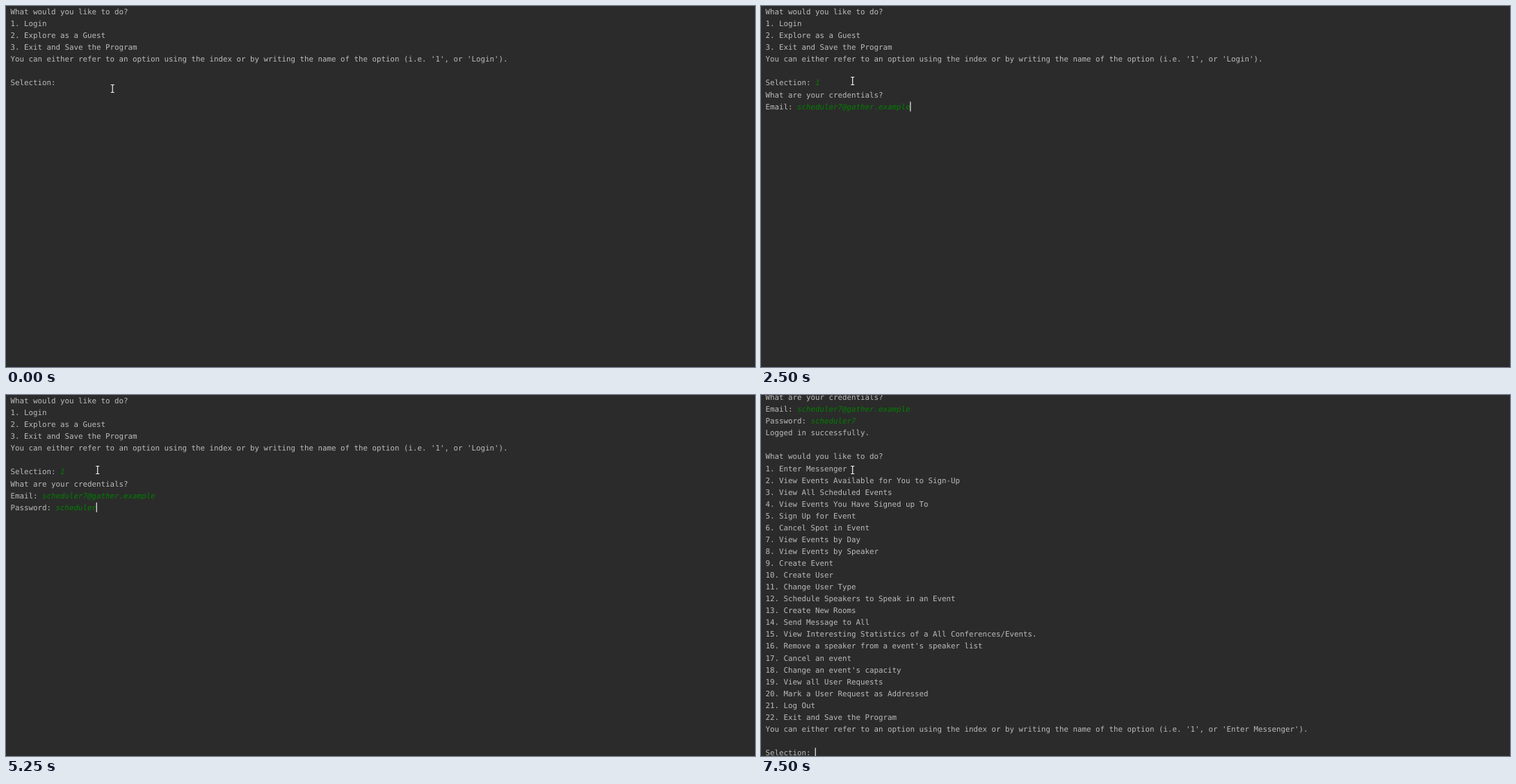
Animation, 1077 px wide and 520 px high, one loop 8000 ms. Source, as an HTML page:

```html
<!DOCTYPE html>
<html lang="en">
<head>
<meta charset="utf-8">
<title>Console login</title>
<style>
  html, body { margin: 0; width: 100%; height: 100%; overflow: hidden; background: #2b2b2b; }
  svg { display: block; }
  text {
    font: 10.8px "DejaVu Sans Mono", monospace;
    fill: #bbb;
    white-space: pre;
    text-rendering: geometricPrecision;
  }
  .input { fill: #007f00; font-style: italic; }
  #caret { fill: #d0d0d0; }
  #pointer { fill: none; stroke: #f4f4f4; stroke-width: 1.2; }
</style>
</head>
<body>
<svg width="1077" height="520">
  <g id="console">
    <g id="rows"></g>
    <rect id="caret" width="1.4" height="14"/>
  </g>
  <path id="pointer" d="M-2.5-5.5H2.5M0-5.5V5.5M-2.5 5.5H2.5"/>
</svg>
<script>
const LOOP = 8000, TICK = 250, BLINK = 500, CARET_HOLD = 750;
const LEFT = 6.4, CHAR = 6.5, BASELINE = 12.12, PITCH = 17.06, LAST_BASELINE = 519;

const hint = name => "You can either refer to an option using the index or by writing " +
  `the name of the option (i.e. '1', or '${name}').`;
const menu = options => [
  "What would you like to do?",
  ...options.map((option, i) => `${i + 1}. ${option}`),
  hint(options[0]), "", "Selection: "
].join("\n");

const START_MENU = menu(["Login", "Explore as a Guest", "Exit and Save the Program"]);
const USER_MENU = menu([
  "Enter Messenger", "View Events Available for You to Sign-Up", "View All Scheduled Events",
  "View Events You Have Signed up To", "Sign Up for Event", "Cancel Spot in Event",
  "View Events by Day", "View Events by Speaker", "Create Event", "Create User",
  "Change User Type", "Schedule Speakers to Speak in an Event", "Create New Rooms",
  "Send Message to All", "View Interesting Statistics of a All Conferences/Events.",
  "Remove a speaker from a event's speaker list", "Cancel an event",
  "Change an event's capacity", "View all User Requests",
  "Mark a User Request as Addressed", "Log Out", "Exit and Save the Program"
]);

const print = (time, text) => ({ time, text, markup: text });
const enter = time => print(time, "\n");
const paste = (time, text) => ({ time, text, markup: `<tspan class="input">${text}</tspan>` });
const type = (time, text) => [...text].map((letter, i) => paste(time + i * 156, letter));

const SESSION = [
  print(-CARET_HOLD, START_MENU),
  paste(1250, "1"), enter(1500),
  print(1750, "What are your credentials?\nEmail: "),
  paste(2500, "scheduler7@gather.example"), enter(3000),
  print(3250, "Password: "),
  ...type(4000, "scheduler"), ...type(5750, "7"), enter(6000),
  print(6250, "Logged in successfully.\n\n" + USER_MENU)
];

const $ = id => document.getElementById(id);
const place = (id, x, y) => $(id).setAttribute("transform", `translate(${x} ${y})`);
const baseline = row => BASELINE + row * PITCH;

let shown = "";
function drawConsole(t) {
  const events = SESSION.filter(event => event.time <= t);
  const lines = events.map(event => event.text).join("").split("\n");
  const row = lines.length - 1;
  const markup = events.map(event => event.markup).join("").split("\n")
    .map((line, i) => `<text x="${LEFT}" y="${baseline(i).toFixed(2)}">${line}</text>`)
    .join("");
  if (markup !== shown) $("rows").innerHTML = shown = markup;

  // The caret blinks steadily but stays lit for a while after each change.
  const lit = t - events.at(-1).time < CARET_HOLD || Math.floor(t / BLINK) % 2 === 1;
  $("caret").style.display = lit ? "" : "none";
  place("caret", LEFT - 0.3 + lines[row].length * CHAR, baseline(row) - 10.8);
  place("console", 0, Math.min(0, LAST_BASELINE - baseline(row)));
}

// The pointer glides in, overshoots to the left and settles.
function drawPointer(t) {
  const left = Math.max(0, 1 - t / 750);
  place("pointer", 131.7 + 21.5 * left ** 2 * (3.8 * left - 2.8), 108 + 11 * left ** 2);
}

function draw() {
  const t = Math.floor(performance.now() % LOOP / TICK) * TICK;
  drawConsole(t);
  drawPointer(t);
  requestAnimationFrame(draw);
}
draw();
</script>
</body>
</html>
```
